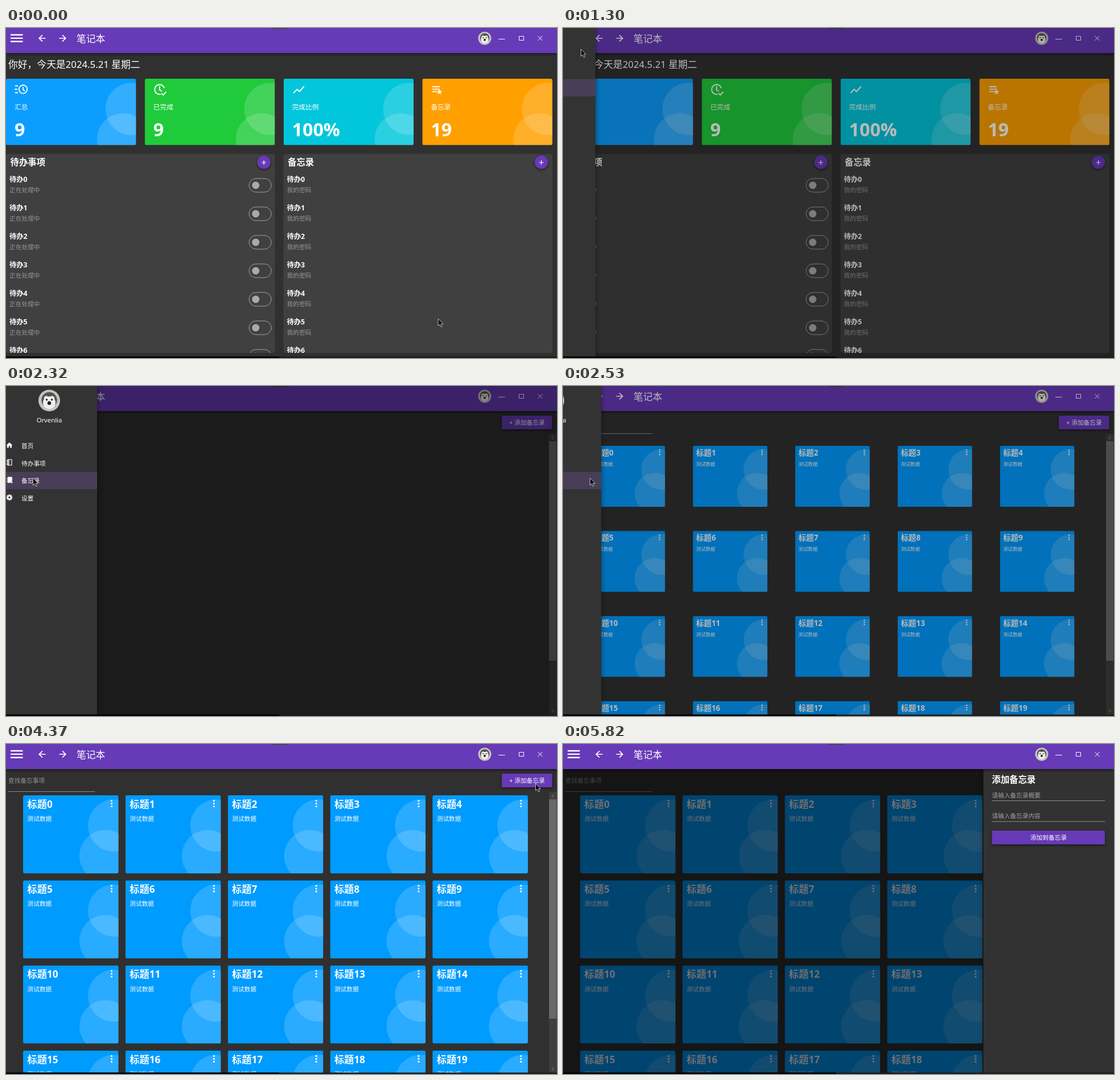
An HTML page with a canvas that plays this animation: 968 by 579 pixels, repeating every 6280 ms.

```html
<!DOCTYPE html>
<html lang="zh-CN">
<head>
<meta charset="utf-8">
<title>笔记本</title>
<style>
html, body { margin: 0; width: 968px; height: 579px; overflow: hidden; background: #303030; }
canvas { display: block; }
</style>
</head>
<body>
<canvas id="stage" width="968" height="579"></canvas>
<script>
const g = document.getElementById('stage').getContext('2d');
const LOOP = 6280, PURPLE = '#673ab7', WHITE = '#fff', GRAY = '#969696';
const FONT = '"Noto Sans", "Noto Sans CJK SC", "Noto Sans CJK", sans-serif';

// Cursor path: time, x, y
const path = [
  [0, 759, 510], [70, 740, 480], [350, 330, 210], [690, 30, 29], [760, 31, 32],
  [960, 31, 32], [1030, 31, 36], [1300, 31, 36], [1570, 44, 198], [1760, 46, 239],
  [2050, 47, 161], [2880, 47, 161], [3080, 279, 223], [3560, 896, 545],
  [3700, 905, 556], [3920, 956, 330], [4230, 935, 86], [4300, 930, 69],
  [5270, 930, 69], [5450, 890, 165], [5620, 900, 330], [5820, 975, 545], [LOOP, 975, 545]
];

const clamp = v => Math.max(0, Math.min(1, v));
const ramp = (t, start, span) => clamp((t - start) / span);
const ease = (t, start, span) => Math.sin(ramp(t, start, span) * Math.PI / 2);

function cursorAt(t) {
  const i = Math.max(1, path.findIndex(p => p[0] >= t));
  const [a, b] = [path[i - 1], path[i]];
  const u = ramp(t, a[0], b[0] - a[0]);
  return [a[1] + (b[1] - a[1]) * u, a[2] + (b[2] - a[2]) * u];
}

function rect(x, y, w, h, color, radius = 0) {
  g.fillStyle = color;
  g.beginPath();
  g.roundRect(x, y, w, h, radius);
  g.fill();
}

function circle(x, y, r, color) {
  g.fillStyle = color;
  g.beginPath();
  g.arc(x, y, r, 0, 7);
  g.fill();
}

// y is the optical middle of the line
function text(str, x, y, size, color = WHITE, weight = 400, align = 'left') {
  g.font = `${weight} ${size}px ${FONT}`;
  g.textAlign = align;
  g.fillStyle = color;
  g.fillText(str, x, y + size * .37);
}

function line(d, x = 0, y = 0, width = 1, color = WHITE) {
  g.save();
  g.translate(x, y);
  g.lineWidth = width;
  g.strokeStyle = color;
  g.stroke(new Path2D(d));
  g.restore();
}

function shape(d, x, y, color = WHITE) {
  g.save();
  g.translate(x, y);
  g.fillStyle = color;
  g.fill(new Path2D(d), 'evenodd');
  g.restore();
}

function clipped(x, y, w, h, draw, radius = 0) {
  g.save();
  g.beginPath();
  g.roundRect(x, y, w, h, radius);
  g.clip();
  draw();
  g.restore();
}

function shadowed(blur, dy, draw) {
  g.save();
  g.shadowColor = 'rgba(0,0,0,.55)';
  g.shadowBlur = blur;
  g.shadowOffsetY = dy;
  draw();
  g.restore();
}

function dim(y, alpha) {
  if (alpha > 0) rect(0, y, 968, 577 - y, `rgba(0,0,0,${alpha})`);
}

function card(x, y, w, h, color) {
  clipped(x, y, w, h, () => {
    rect(x, y, w, h, color);
    circle(x + w - 8, y + 53, 45.7, 'rgba(255,255,255,.16)');
    circle(x + w - 23, y + 106.5, 45.7, 'rgba(255,255,255,.16)');
  }, 3);
}

function avatar(x, y, r) {
  g.save();
  g.translate(x, y);
  g.scale(r, r);
  circle(0, 0, 1, '#c4c3c0');
  circle(0, -.05, .72, '#55534f');
  circle(0, .2, .58, '#f0efec');
  circle(-.27, -.2, .22, '#f0efec');
  circle(.27, -.2, .22, '#f0efec');
  circle(-.24, -.08, .09, '#222');
  circle(.24, -.08, .09, '#222');
  circle(0, .24, .17, '#222');
  g.restore();
}

function titleBar() {
  shadowed(5, 2, () => rect(0, 0, 968, 44, PURPLE));
  rect(466, 0, 28, 1.3, '#39452f');
  line('M8 12H29.5M8 17.9H29.5M8 23.8H29.5', 0, 0, 2.4);
  line('M69.5 18H58.5M64 12.3L58.2 18L64 23.7', 0, 0, 1.7);
  line('M93.5 18H104.5M99 12.3L104.8 18L99 23.7', 0, 0, 1.7);
  text('笔记本', 124, 18.5, 16.8);
  avatar(841, 18, 11.5);
  line('M865 19.5H876.5M901.5 14.5H909.5V21.5H901.5ZM934.5 14L942.5 22M942.5 14L934.5 22');
}

const stats = [
  ['汇总', '9', '#0c9eff', (x, y) => {
    line('M7 0A7.2 7.2 0 1 0 7 .01M14.2 -4V1L17.5 3M0 -6H5M-1 0H4M0 6H5'.replace('M7 0A7.2 7.2 0 1 0 7 .01', 'M6.8 0A7.2 7.2 0 1 1 6.8 .1'), x + 16, y + 18.5, 1.8);
  }],
  ['已完成', '9', '#1fcb3b', (x, y) => {
    line('M17.8 6.6A8.6 8.6 0 1 0 11.5 17.2M9.5 3V9.5L13.5 12M13 15.5L16 18.5L21 13', x + 16.5, y + 10, 1.9);
  }],
  ['完成比例', '100%', '#02c6dc', (x, y) => {
    line('M0 12L6.5 5.5L10.5 9.5L18.5 .5', x + 17.5, y + 13, 1.9);
  }],
  ['备忘录', '19', '#ffa000', (x, y) => {
    line('M0 0H13M0 4.3H13M0 8.6H8', x + 17.5, y + 14, 1.8);
    shape('M0 -5L1.3 -1.6L5 -1.5L2.1 .8L3.1 4.4L0 2.3L-3.1 4.4L-2.1 .8L-5 -1.5L-1.3 -1.6Z', x + 30, y + 23);
  }]
];

function listPanel(x, title, sub, toggles) {
  rect(x, 221, 472.4, 349, '#404040', 4);
  text(title, x + 7.5, 235.5, 15.4, WHITE, 700);
  shadowed(4, 1.5, () => circle(x + 453, 235.5, 11.7, PURPLE));
  line('M-4 0H4M0 -4V4', x + 453, 236, 1.2);
  clipped(x, 250, 472, 320, () => {
    for (let i = 0; i < 7; i++) {
      const y = 265.5 + 50 * i;
      text('待办' + i, x + 6, y, 12.3, WHITE, 700);
      text(sub, x + 6, y + 19, 10.7, GRAY);
      if (!toggles) continue;
      g.strokeStyle = '#a2a2a2';
      g.lineWidth = 1;
      g.beginPath();
      g.roundRect(427, y - 1.5, 39, 24, 12);
      g.stroke();
      circle(438.7, y + 10.5, 6.5, '#aaa');
    }
  });
}

function homePage() {
  text('你好，今天是2024.5.21 星期二', 4, 63.5, 16.8);
  stats.forEach(([label, value, color, icon], i) => {
    const x = 243.8 * i, y = 89;
    card(x, y, 228.5, 116.5, color);
    icon(x, y);
    text(label, x + 15, y + 50, 11.7);
    text(value, x + 15, y + 89, 32.2, WHITE, 700);
  });
  listPanel(0, '待办事项', '正在处理中', true);
  listPanel(487.5, '备忘录', '我的密码', false);
}

function memoCard(i, scale) {
  const x = 30 + 179.8 * (i % 5), y = 90 + 149.3 * Math.floor(i / 5);
  const w = 167.7, h = 137;
  g.save();
  g.translate(x + w / 2, y + h / 2);
  g.scale(scale, scale);
  g.translate(-w / 2, -h / 2);
  card(0, 0, w, h, '#009bff');
  text('标题' + i, 7.5, 15.5, 17.2, WHITE, 700);
  text('测试数据', 7.5, 41, 10.7);
  for (const dy of [9.5, 14.5, 19.5]) circle(155.5, dy, 1.6, WHITE);
  g.restore();
}

function memoPage(t) {
  text('查找备忘事项', 4, 64, 10.7, GRAY);
  line('M4 83.5H156.5', 0, 0, 1, '#8d8d8d');
  shadowed(4, 1.5, () => rect(871, 52, 88.5, 24, PURPLE, 2));
  text('+ 添加备忘录', 915.5, 64.5, 10.7, WHITE, 500, 'center');
  const scale = ease(t, 2320, 370);
  clipped(0, 84, 954, 493, () => {
    for (let i = 0; i < 20; i++) memoCard(i, scale);
  });
  rect(954, 84, 14, 493, '#3e3e3e');
  rect(954, 97, 13, 385, '#686868');
  line('M957.5 92L960.5 88.5L963.5 92M960.5 88.5V95M957.5 569L960.5 572.5L963.5 569M960.5 572.5V566', 0, 0, 1, '#666');
}

function rightDrawer(t) {
  const open = ease(t, 4589, 481);
  if (!open) return;
  const x = 968 - 229.5 * open;
  clipped(0, 44, 968, 533, () => {
    shadowed(9, 0, () => rect(x, 40, 230, 540, '#323232'));
    text('添加备忘录', x + 15, 62.5, 15.4, WHITE, 700);
    text('请输入备忘录概要', x + 15, 90, 10.7, '#a0a0a0');
    text('请输入备忘录内容', x + 15, 126.5, 10.7, '#a0a0a0');
    line('M15 99.5H213.5M15 136H213.5', x, 0, 1, '#8d8d8d');
    shadowed(4, 1.5, () => rect(x + 15, 152, 198.5, 24, PURPLE, 2));
    text('添加到备忘录', x + 114.5, 164.5, 10.7, WHITE, 500, 'center');
  });
}

const book = 'M-3 -5H4V5H-3ZM-5 -3.2H-2M-5 0H-2M-5 3.2H-2M-1 -5V5';
const menu = [
  ['首页', () => shape('M0 -5L5.5 0H4V4.5H1.2V1H-1.2V4.5H-4V0H-5.5Z', 6, 104)],
  ['待办事项', () => line(book, 6, 134, 1.2)],
  ['备忘录', () => {
    shape('M-3 -5.5H5V1L1 5H-3Z', 6, 165);
    line('M-5 -3H-2M-5 0H-2M-5 3H-2M2 4H6M4 2V6', 6, 165, 1.2);
  }],
  ['设置', () => {
    for (let i = 0; i < 4; i++) {
      g.save();
      g.translate(6, 195.5);
      g.rotate(i * Math.PI / 4);
      rect(-1.2, -5.3, 2.4, 10.6, WHITE);
      g.restore();
    }
    circle(6, 195.5, 4, WHITE);
    circle(6, 195.5, 1.8, '#333');
  }]
];

function leftDrawer(t) {
  const open = ease(t, 1220, 350) - ease(t, 2393, 350);
  if (open <= 0) return;
  const selected = t < 2320 ? 0 : 2;
  const hovered = t < 2320 ? Math.floor((cursorAt(t - 70)[1] - 90) / 30.5) : 2;
  g.save();
  g.translate(160 * (open - 1), 0);
  shadowed(9, 0, () => rect(0, 0, 160, 576, '#333'));
  avatar(76, 25.5, 19);
  text('Orvenlia', 76, 60, 11.3, WHITE, 400, 'center');
  menu.forEach(([label, icon], i) => {
    const y = 89.7 + 30.5 * i;
    if (i === selected || i === hovered) rect(0, y, 160, 30.3, '#493e58');
    icon();
    text(label, 27, y + 15.5, 10.7);
  });
  g.restore();
}

function pointer(t) {
  const [x, y] = cursorAt(t);
  const arrow = 'M.5 .5V13L3.4 10.3L5.5 15L7.5 14.1L5.4 9.6H9.2Z';
  shape(arrow, x, y, '#000');
  line(arrow, x, y, .9, '#d0d0d0');
}

function frame(now) {
  const t = now % LOOP;
  rect(0, 0, 968, 579, '#303030');
  if (t < 2320) homePage(); else memoPage(t);
  dim(44, .56 * ramp(t, 4540, 340));
  rightDrawer(t);
  titleBar();
  dim(0, .43 * (ramp(t, 1090, 335) - ramp(t, 2400, 350)));
  leftDrawer(t);
  rect(0, 576.5, 968, 2.5, '#1c1c1c');
  rect(0, 576.5, 480, 2.5, '#000');
  pointer(t);
  requestAnimationFrame(frame);
}
requestAnimationFrame(frame);
</script>
</body>
</html>
```
